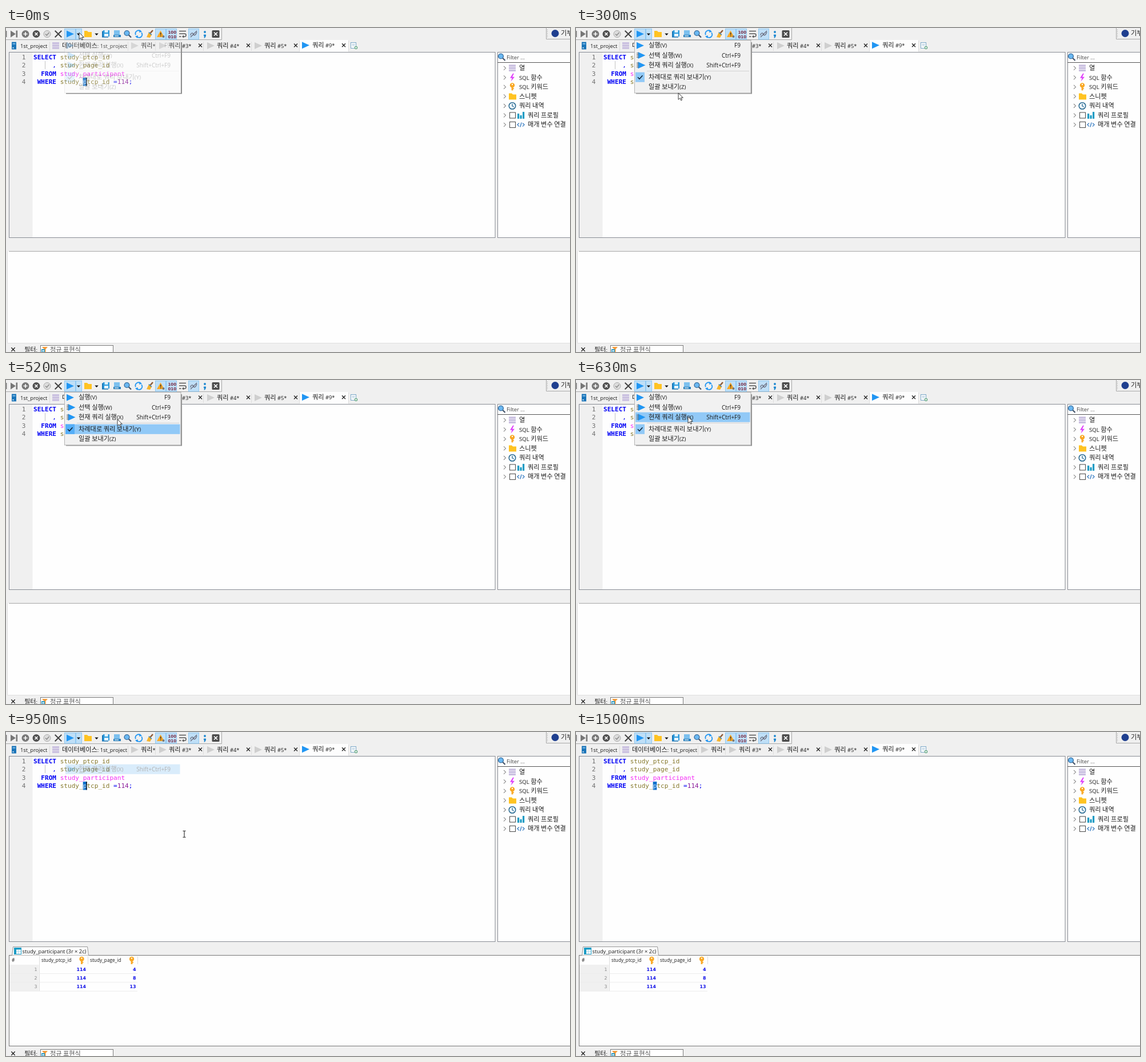
These frames come from a looping animation (987x568 px, 1.76 s). An HTML page:

```html
<!DOCTYPE html>
<html lang="ko">
<head>
<meta charset="utf-8">
<title>SQL editor</title>
<style>
html, body { margin: 0; width: 100%; height: 100%; overflow: hidden; background: #f0f0f0; }
svg { display: block; width: 100vw; height: 100vh; }
text { font-family: "Open Sans", "Noto Sans CJK KR", "Noto Sans CJK", sans-serif; white-space: pre; }
.mono { font-family: "DejaVu Sans Mono", monospace; font-size: 11.08px; }
.num { font-family: "DejaVu Sans", sans-serif; font-size: 7.9px; }
</style>
</head>
<body>
<svg id="stage" viewBox="0 0 987 568" preserveAspectRatio="none" xmlns="http://www.w3.org/2000/svg"></svg>
<script>
const LOOP = 1760;
const BLUE = '#2196f3', DARK = '#4c4c4c', PALE = '#cfcfcf', HOT = '#91c9f7', YELLOW = '#ffc322';

const rect = (x, y, w, h, fill, more = '') =>
  `<rect x="${x}" y="${y}" width="${w}" height="${h}" fill="${fill}" ${more}/>`;
const path = (d, fill, more = '') => `<path d="${d}" fill="${fill}" ${more}/>`;
const line = (d, color, w = 1, more = '') =>
  `<path d="${d}" fill="none" stroke="${color}" stroke-width="${w}" ${more}/>`;
const disc = (x, y, r, fill, more = '') => `<circle cx="${x}" cy="${y}" r="${r}" fill="${fill}" ${more}/>`;
const group = (id, body, more = '') => `<g id="${id}" ${more}>${body}</g>`;

// Label centred on y; Hangul runs are set slightly larger than Latin ones.
function label(x, y, s, { size = 9.3, fill = '#1c1c1c', more = '' } = {}) {
  const body = s.replace(/[가-힣]+/g, m => `<tspan font-size="11.2">${m}</tspan>`);
  return `<text x="${x}" y="${y + 3.7}" font-size="${size}" fill="${fill}" ${more}>${body}</text>`;
}

const COL = 6.67;
const codeX = col => 48 + col * COL;
const rowY = row => 54.5 + row * 14.65;
const code = (row, col, s, fill, bold) =>
  `<text class="mono" x="${codeX(col)}" y="${rowY(row)}" fill="${fill}" ${bold ? 'font-weight="700"' : ''}>${s}</text>`;

const play = (x, y, fill = BLUE) => path(`M${x} ${y - 6}L${x + 13} ${y}L${x} ${y + 6}Z`, fill);
const cross = (x, y, r, color, w) =>
  line(`M${x - r} ${y - r}L${x + r} ${y + r}M${x + r} ${y - r}L${x - r} ${y + r}`, color, w);
const drop = x => path(`M${x - 3.2} 9.5h6.4l-3.2 3.4Z`, '#111');
const folder = (x, y) => path(`M${x} ${y}h5l2 2h6v9h-13Z`, YELLOW);
const bars = (x, y) => [0, 4.2, 8.4].map(d => rect(x, y + d, 12, 3.4, '#c9bfe0')).join('');
const lens = (x, y) => line(`M${x + 3} ${y + 3}l4.5 4.5`, '#44546a', 2.2) +
  disc(x, y, 4.4, '#6bb8f2', 'stroke="#3c6f9e" stroke-width="1.4"');
const key = (x, y) => disc(x, y - 2, 4.2, '#f9a825') + rect(x - 1.4, y, 2.8, 7, '#f9a825') +
  rect(x, y + 3, 3, 1.6, '#f9a825') + disc(x, y - 3.4, 1.2, '#fff');

function toolbar() {
  const on = (x, w) => rect(x + .5, 1.5, w - 1, 18.5, '#bfdff7', 'stroke="#8fc8f2"');
  return line('M0 20.5H377.5V0M945.5 0V19.5H987', '#a8a8a8') + line('M947.5 3v15', '#8c8c8c', 1, 'stroke-dasharray="1 2"') +
    on(102, 20) + on(122, 11) + on(261, 19) + on(280, 19) + on(319, 19) +
    rect(0, 5, 1.4, 11, '#777') +
    path('M8 4.5L17 10.5L8 16.5Z', '#777') + rect(17.5, 4.5, 2.6, 12, '#777') +
    disc(34, 10.5, 6.5, '#777') + line('M30.5 10.5h7M34 7v7', '#fff', 1.6) +
    disc(53, 10.5, 6.5, '#505050') + cross(53, 10.5, 2.5, '#fff', 1.6) +
    disc(72, 10.5, 6, '#ddd', 'stroke="#aaa"') + line('M69 10.5l2.3 2.5l4-5', '#888', 1.4) +
    cross(91.5, 10.5, 5.8, '#444', 2) +
    play(106, 10.5) + drop(127) + folder(137, 5) + drop(158.5) +
    rect(168, 5.5, 11, 11, '#1976b8') + rect(170, 4, 11, 11, '#2c9bdc') + rect(172.5, 4, 6, 4, '#dff1fc') + rect(172, 10, 7, 5, '#e8f5fd') +
    rect(189, 4, 10, 9, '#7cc0ee') + rect(188, 12, 13, 4, '#2a80bd') + rect(190, 13.3, 7, 1.2, '#fff') +
    lens(211.5, 9) +
    line('M227 12a5.3 5.3 0 0 1 8-6.5M237 8a5.3 5.3 0 0 1-8 7', BLUE, 1.8) +
    path('M234 3l4 3.5l-5 1.5ZM230 18l-4-3.5l5-1.5Z', BLUE) +
    line('M257 4l-4.5 5', '#8d5a35', 2.4) + path('M250 7.5l5 4.5l-3 5l-6-1Z', '#f6b42c') + line('M250 7.5l5 4.5', '#3b82b8', 1.6) +
    path('M270.5 4.5L277 16H264Z', '#f9a825') + rect(270, 8, 1.4, 4, '#333') + rect(270, 13, 1.4, 1.4, '#333') + disc(275.5, 15, 2, '#777') +
    ['100', '010'].map((s, i) => `<text class="num" x="283.5" y="${9.5 + i * 8}" style="font-size:7px" font-weight="700" fill="#7a2d45">${s}</text>`).join('') +
    line('M303 5.5h12M303 10h9.5a2.6 2.6 0 0 1 0 5.2H309M303 15h3.5', '#555', 1.4) + path('M311 12.6v5l-3-2.5Z', '#555') +
    line('M323 13c0-5 4-5 5-2s4 2 6-4M323 16l11-11', '#667', 1.2) +
    disc(348, 7, 1.9, '#1e88d0') + path('M346 11.5h4v2.5l-2 3.5h-1.6l.8-3h-1.2Z', '#1e88d0') +
    `<rect id="stop" x="360.5" y="4" width="13" height="13" rx="1.5"/>` + cross(367, 10.5, 3, '#fff', 1.7) +
    disc(961, 9.5, 6.5, '#1f3f8f') + label(971, 9.5, '기부');
}

function tabs() {
  let out = rect(514, 21, 85, 21, '#fdfdfd') +
    line('M76.5 24V40M213.5 24V40M261.5 24V40M345.5 24V40M429.5 24V40M513.5 22V41M599.5 22V41', '#dcdcdc') +
    rect(10, 24.5, 8, 13, '#1c75b9') + rect(11.5, 27, 5, 1.4, '#9fd4f7') + rect(11.5, 34, 2, 1.5, '#fff') +
    label(25, 31.3, '1st_project') + bars(81, 25) + label(98, 31.3, '데이터베이스: 1st_project') +
    play(219, 31, PALE) + label(236, 31, '쿼리*');
  [[268, '#3*'], [352, '#4*'], [435, '#5*']].forEach(([x, s]) => {
    out += play(x, 31, PALE) + label(x + 17, 31, '쿼리 ' + s) + cross(x + 72, 30.5, 3, '#222', 1.3);
  });
  return out + play(518, 30.3) + label(536, 30, '쿼리 #9*') + cross(591, 30.3, 3, '#222', 1.3) +
    rect(603.5, 25.5, 9, 10, '#fff', 'stroke="#7aa7c7"') + line('M605.5 28.5h5M605.5 31h5', '#9bbdd4') +
    disc(612.5, 34.5, 2.8, '#6fae8c') + line('M611 34.5h3M612.5 33v3', '#fff');
}

function editor() {
  const ID = '#85782a', KW = '#0000f5';
  let out = rect(5.5, 42.5, 850.5, 325, '#fefefe', 'stroke="#888c94"') + rect(6, 43, 40.5, 324, '#f0f0f0') +
    line('M68.5 58V72', '#c4c4c4');
  for (let i = 0; i < 4; i++)
    out += `<text class="mono" x="34.5" y="${rowY(i)}" text-anchor="end" fill="#707070">${i + 1}</text>`;
  return out + code(0, 0, 'SELECT', KW, 1) + code(0, 7, 'study_ptcp_id', ID) +
    code(1, 5, ',', KW) + code(1, 7, 'study_page_id', ID) +
    code(2, 2, 'FROM', KW, 1) + code(2, 7, 'study_participant', '#f52bf5') +
    code(3, 1, 'WHERE', KW, 1) + code(3, 7, 'study_', ID) + code(3, 14, 'tcp_id', ID) +
    rect(codeX(13), 87, COL, 14.5, '#0f70cc') + code(3, 13, 'p', '#cfe4f8') +
    code(3, 21, '=', KW) + code(3, 22, '114', '#8a1a9a') + code(3, 25, ';', KW) +
    `<rect id="caret" x="140.3" y="87" width="1.4" height="14.5" fill="#111"/>`;
}

function sidebar() {
  const names = ['열', 'SQL 함수', 'SQL 키워드', '스니펫', '쿼리 내역', '쿼리 프로필', '매개 변수 연결'];
  const y = i => 70.3 + i * 16.55;
  const box = i => rect(881.5, y(i) - 5, 10, 10, '#fff', 'stroke="#444"');
  let out = rect(860.5, 42.5, 130, 325, '#fefefe', 'stroke="#888c94"') + line('M860 60.5H987', '#555') +
    lens(866, 49.5) + label(876, 51, 'Filter ...', { fill: '#444' });
  names.forEach((s, i) => {
    out += line(`M871 ${y(i) - 3.5}l3.5 3.5l-3.5 3.5`, '#8a8a8a', 1.1) + label(i > 4 ? 913 : 898, y(i), s, { size: 9.6 });
  });
  return out + bars(880, y(0) - 6) +
    path(`M887 ${y(1) - 7}l-5 8h3.5l-2 6l6.500-8h-4l3-6Z`, '#e040fb') +
    key(886, y(2) - 1) + folder(880, y(3) - 5.5) +
    disc(886, y(4), 5.8, '#eaf4fb', 'stroke="#27688f" stroke-width="1.5"') + line(`M886 ${y(4) - 3.5}v3.5l2.5 2`, '#27688f', 1.2) +
    box(5) + rect(895, y(5) - 3, 3.2, 9, '#1a9bc4') + rect(899.5, y(5), 3.2, 6, '#1a9bc4') + rect(904, y(5) - 6, 3.2, 12, '#1a9bc4') +
    box(6) + line(`M898 ${y(6) - 3}l-3 3l3 3M904 ${y(6) - 3}l3 3l-3 3M902 ${y(6) - 4}l-2 8`, '#2f77c0', 1.3);
}

function lowerPane() {
  return rect(2, 391, 985, 161.5, '#fefefe') + line('M5 391.5H987', '#a6a6a6') + line('M2.5 391V552.5H987', '#dedede') +
    cross(12.5, 563.5, 3.2, '#222', 1.4) + label(32, 564.3, '필터:') +
    rect(60.5, 556.5, 127, 16, '#fff', 'stroke="#7a7a7a"') +
    path('M63 559h10l-3.500 4v5h-3v-5Z', '#f39c3c') + rect(62, 563, 6, 5, '#2c9bc9') + rect(63.5, 565, 3, 2, '#fff') +
    label(77, 564.3, '정규 표현식', { fill: '#555' });
}

function results() {
  let out = rect(2, 391, 3, 162, '#f0f0f0') + rect(2, 550, 985, 3, '#f0f0f0') +
    rect(5.5, 391.5, 990, 159, '#fefefe', 'stroke="#777"') +
    path('M10.500 391.500L12.500 376.500H142.500L144.500 391.500', '#fbfbfb', 'stroke="#999"') +
    rect(14, 378, 13, 12, '#1a9bc4') + rect(18, 381.5, 8, 7.5, '#fff') + line('M18 385h8M22 381v8', '#a4d5e8') +
    label(28.5, 384.6, 'study_participant (3r × 2c)') +
    label(10, 399.6, '#', { size: 8.3 }) + label(62, 399.6, 'study_ptcp_id', { size: 8.25 }) +
    label(147, 399.6, 'study_page_id', { size: 8.25 }) + key(132.5, 400) + key(220, 400) +
    rect(6, 408, 51.5, 46, '#f0f0f0') +
    line('M58.500 393V454M143.500 393V407M230.500 393V407', '#ddd');
  [4, 8, 13].forEach((page, i) => {
    const y = 418.6 + i * 15.4;
    const num = (x, s, more) => `<text class="num" x="${x}" y="${y}" text-anchor="end" ${more}>${s}</text>`;
    out += num(54.5, i + 1, 'fill="#888"') + num(140, 114, 'fill="#1010e8" font-weight="700"') +
      num(227.5, page, 'fill="#1010e8" font-weight="700"') + line(`M6 ${y + 4.9}H230`, '#ececec');
  });
  return out;
}

// Menu
const ITEMS = [
  ['실행(V)', 'F9', 30.7], ['선택 실행(W)', 'Ctrl+F9', 48], ['현재 쿼리 실행(X)', 'Shift+Ctrl+F9', 65.3],
  ['차례대로 쿼리 보내기(Y)', '', 86.3], ['일괄 보내기(Z)', '', 103.6]
];
const bar = y => rect(104, y - 8.7, 200.500, 17.2, HOT);
function item(i) {
  const [s, keys, y] = ITEMS[i];
  const mark = i < 3 ? play(i ? 108.5 : 106, y) : '';
  const rows = i === 1 || i === 2 ? line(`M106 ${y - 4}h4M106 ${y - 1.5}h4M106 ${y + 1}h4M106 ${y + 3.5}h4`, '#666', 1) : '';
  const check = i === 3 ? line(`M108 ${y}l3 3l5.500-6`, '#123', 1.5) : '';
  return mark + rows + check + label(127, y, s, { size: 9.8 }) +
    label(288, y, keys, { size: 10, more: 'text-anchor="end"' });
}
const menuBody = rect(102.5, 21.5, 203.500, 92.500, '#f1f1f1', 'stroke="#b4b4b4"') +
  rect(104, 77.6, 16, 17.2, HOT) +
  ITEMS.map((it, i) => group('hot' + i, bar(it[2]) + (i === 3 ? rect(104, 77.6, 16, 17.2, '#55aef8') : ''))).join('') +
  line('M124 75.500H303', '#d2d2d2') + ITEMS.map((_, i) => item(i)).join('');

const pointer = path('M0 0V11.500L2.700 9L4.700 13L6.500 12.200L4.700 8.300H8.300Z', '#fff', 'stroke="#222" stroke-width=".9"');
const beam = line('M-2.500-5.500H-.6L0-5L.6-5.500H2.500M0-5V5M-2.500 5.500H-.6L0 5L.6 5.500H2.500', '#222', 1.1);
const ring = disc(9, 2.500, 4.500, '#cfe9fb', 'stroke="#2585c7" stroke-width="1.8"');

const stage = document.getElementById('stage');
stage.innerHTML = rect(0, 0, 987, 568, '#f0f0f0') + tabs() + toolbar() + editor() + sidebar() + lowerPane() +
  group('grid', results()) +
  group('shadow', path('M306 25h2V115.500H105V114H306Z', '#8c8c8c')) +
  group('menu', menuBody) + group('chosen', bar(ITEMS[2][2]) + item(2)) +
  group('mouse', group('arrow', pointer) + group('busy', ring) + group('ibeam', beam));

const el = {};
stage.querySelectorAll('[id]').forEach(n => el[n.id] = n);
const show = (id, on) => el[id].setAttribute('display', on ? 'inline' : 'none');
const fade = (id, a) => { show(id, a > 0); el[id].setAttribute('opacity', a); };

// Pointer route: time, x, y
const ROUTE = [
  [0, 128, 8], [30, 129, 10], [90, 150, 84], [120, 166, 118], [200, 173, 142], [300, 179, 114], [400, 187, 107],
  [490, 193, 82], [520, 195, 69], [550, 196, 66], [640, 196, 64], [790, 197, 62], [840, 200, 66],
  [940, 312, 179], [1200, 312, 179], [1470, 708, 539], [LOOP, 708, 539]
];
function mouseAt(t) {
  const i = Math.max(1, ROUTE.findIndex(p => p[0] >= t));
  const [a, b] = [ROUTE[i - 1], ROUTE[i]];
  const k = Math.max(0, (t - a[0]) / (b[0] - a[0]));
  return [a[1] + (b[1] - a[1]) * k, a[2] + (b[2] - a[2]) * k];
}

function draw(t) {
  const open = t < 700;
  fade('menu', open ? Math.min(1, .22 + Math.max(0, t - 30) / 110) : 0);
  show('shadow', open);
  const hoverY = mouseAt(Math.max(0, t - 30))[1];  // highlight trails the pointer
  ITEMS.forEach((it, i) => show('hot' + i, Math.abs(hoverY - it[2]) < 8.7));
  fade('chosen', open ? 0 : Math.max(0, Math.min(1, 1 - (t - 710) / 362)));

  const running = t >= 720 && t < 900;
  el.stop.setAttribute('fill', running ? '#ea4b32' : DARK);
  show('grid', t >= 910);
  show('caret', t < 1230);

  const [x, y] = mouseAt(t);
  const text = t > 840 && y > 42 && y < 368;
  el.mouse.setAttribute('transform', `translate(${x.toFixed(2)} ${y.toFixed(2)})`);
  show('mouse', t < 1500);
  show('arrow', !text);
  show('ibeam', text);
  show('busy', running && !text);
}

const start = performance.now();
function tick() {
  draw((performance.now() - start) % LOOP);
  requestAnimationFrame(tick);
}
draw(0);
requestAnimationFrame(tick);
</script>
</body>
</html>
```
